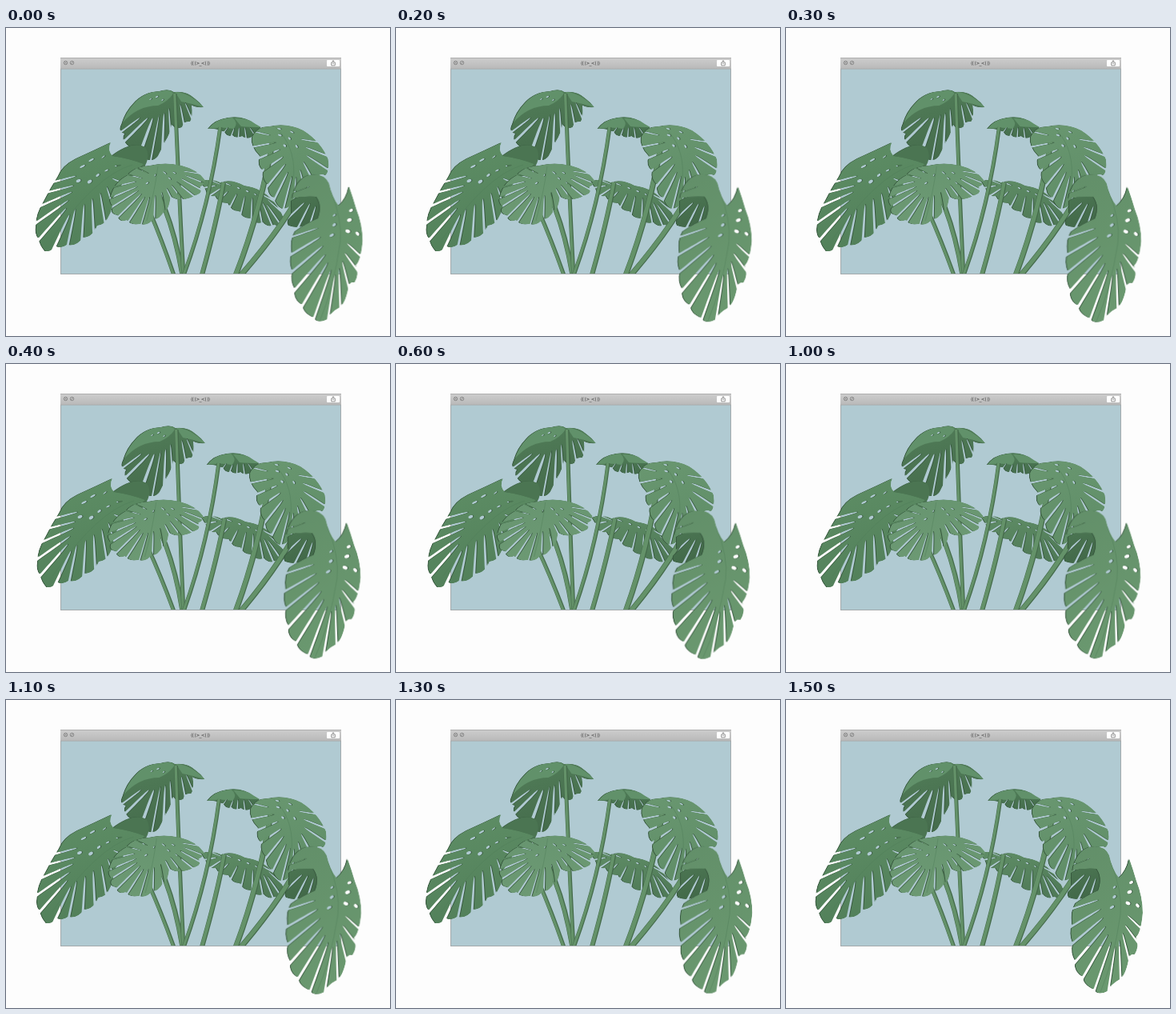
Animation of 480x385 px, one loop 1.6 s. Source, as an HTML page:

```html
<!DOCTYPE html>
<html>
<head>
<meta charset="utf-8">
<title>Swaying monstera</title>
<style>
html, body { margin: 0; width: 100%; height: 100%; overflow: hidden; background: #fdfdfd; }
svg { display: block; }
#scene { position: absolute; left: 0; top: 0; }
.leaf { filter: drop-shadow(-.5px .9px 0 #36573d); }
.title { font: 6px "DejaVu Sans", sans-serif; fill: #444; }
</style>
</head>
<body>
<svg id="scene" width="480" height="385" viewBox="0 0 480 385">
  <defs>
    <linearGradient id="bar" x2="0" y2="1"><stop stop-color="#cdcdcd"/><stop offset="1" stop-color="#b9b9b9"/></linearGradient>
  </defs>
  <rect x="68.5" y="37.5" width="350" height="270" fill="#b0cad2" stroke="#a3a9ab"/>
  <rect x="68" y="37" width="351" height="14" fill="url(#bar)"/>
  <path d="M68 37.5H419M68 51.2H419" stroke="#a9a9a9" stroke-width=".8"/>
  <g fill="none" stroke="#777" stroke-width=".8">
    <circle cx="74.5" cy="43.5" r="2.2"/><circle cx="82.5" cy="43.5" r="2.2"/>
    <path d="M73.6 42.6l1.8 1.8m0-1.8l-1.8 1.8M81.3 44.7l2.4-2.4"/>
  </g>
  <text class="title" x="243" y="46" text-anchor="middle" textLength="24">(( (&gt;_&lt;) ))</text>
  <rect x="401" y="40" width="16" height="8" rx="1" fill="#fff"/>
  <path d="M408 43h-1.3v3.8h4.6V43H410M409 45v-4.2m-1.3 1.2l1.3-1.3 1.3 1.3" fill="none" stroke="#666" stroke-width=".7"/>
  <g id="rear"></g>
  <svg width="480" height="307" id="stems"></svg>
  <g id="front"></g>
</svg>
<script>
const byId = id => document.getElementById(id);

// cuts: outer x, outer y, inner x, inner y, half width.  holes: x, y, rx, ry, angle.
// sway: pivot x, pivot y, shift, stretch, shear, drop.
const leaves = [
  { layer: 'rear', fill: ['#527e59', '#456c4c'], sway: [200, 80, 3, 0, 0, 0],
    outline: 'M145 120Q150 104 160 94 172 80 192 79 204 75 210 80 226 78 236 88 243 93 247 99 238 100 232 96 234 112 230 117 222 116 220 124 212 128 208 120 204 134 200 140 194 152 190 160 184 168 176 164 172 152 168 150 160 154 152 146 144 138 149 132 140 130 145 120Z',
    over: 'M145 119Q150 104 160 94 172 80 192 79 206 76 209 82 202 92 190 97 164 97 145 119ZM211 80Q228 80 247 99 230 94 219 92Z',
    cuts: [[143,131,168,112,1.5],[148,142,178,112,2],[168,157,184,112,2.5],[181,168,192,108,1.5],[196,152,198,106,2],[206,133,204,100,1.5],[214,127,212,98,1.5],[223,122,218,95,1.5],[232,112,224,93,1.3]],
    holes: [[189,86,2.5,1,-25],[196,90,2,1,-40],[181,89,2,.8,-25]] },
  { layer: 'rear', fill: ['#52805a', '#456e4d'], sway: [290, 115, -3, -.02, 0, 0],
    outline: 'M253 126Q262 114 278 112 298 109 312 120L319 124Q312 131 306 137 300 139 296 135 288 139 284 134 278 137 274 130 262 125 253 126Z',
    over: 'M253 126Q262 113 283 112 291 118 285 126 268 123 253 126ZM286 113Q306 112 319 124 304 124 294 123Z',
    cuts: [[272,132,278,124,1],[281,138,286,125,1.3],[291,139,292,124,1.3],[301,139,299,124,1.3],[311,133,305,124,1]],
    holes: [] },
  { layer: 'rear', fill: ['#5f8d66', '#507b58'], sway: [295, 195, 2, .01, 0, 0],
    outline: 'M244 192Q254 187 268 193 282 188 298 197 320 200 334 216 346 230 347 240 344 250 336 246 328 250 322 243 312 246 306 238 296 238 292 229 282 229 278 219 266 219 262 210 252 212 250 202Z',
    cuts: [[247,200,263,197,1.2],[253,211,270,200,1.3],[264,218,278,204,1.4],[279,227,289,207,1.5],[293,237,299,210,1.5],[307,243,308,212,1.5],[321,247,315,215,1.5],[334,249,321,218,1.5],[344,246,326,220,1.4],[347,232,327,214,1.2],[335,216,320,208,1.1],[269,192,282,197,1],[253,189,270,196,.8]],
    holes: [[291,200,2.4,1,25],[302,204,2.5,1,25],[312,208,2,1,30]] },
  { layer: 'front', fill: ['#5f8f66', '#52805a'], sway: [110, 150, 3, 0, 0, 0],
    under: 'M132 160Q158 140 174 149 183 163 167 182L148 188Z',
    outline: 'M131 143Q110 153 88 163 70 172 65 186 56 200 48 216 38 232 38 246 36 258 41 263 43 272 49 279 58 280 62 272 68 277 76 271 88 274 96 262 108 262 114 247 124 246 128 236 134 226 134 212 146 196 150 186 160 182 172 170 154 163 133 160 126 152 131 143Z',
    cuts: [[62,192,88,185,1.3],[54,205,85,197,1.4],[45,222,83,205,1.5],[39,243,79,215,1.8],[41,265,76,225,2],[59,278,80,233,2.2],[77,275,87,226,2],[95,268,98,220,2],[110,254,108,213,2],[124,242,118,206,1.8],[134,222,126,198,1.6],[147,194,133,188,1.3]],
    holes: [[107,165,4,1.4,-28],[96,173,4,1.4,-25],[122,161,3,1,-35],[91,191,3.5,2,-20],[105,192,3.5,2.2,-30],[115,184,3,1.6,-30],[126,178,3,1.2,-25],[140,172,4,1,-12]],
    rib: 'M158 171Q112 184 56 265' },
  { layer: 'front', fill: ['#679570', '#6c9973'], sway: [190, 172, -3.5, 0, 0, 0],
    outline: 'M131 210Q136 192 152 184 160 173 180 172 200 167 220 172 240 177 249 190 248 198 243 198 246 206 240 208 226 216 214 214 208 212 206 210 204 228 198 229 192 240 184 239 178 248 168 245 156 247 152 240 142 244 140 234 130 232 134 224 128 216 131 210Z',
    cuts: [[134,199,163,192,1],[130,213,165,198,1.2],[130,226,166,203,1.4],[139,238,170,207,1.5],[152,245,174,211,1.5],[169,248,180,211,1.3],[186,241,187,209,1.5],[199,232,195,205,1.5],[208,214,201,200,1.4],[223,217,207,196,1.3],[237,211,213,192,1.3],[246,203,219,188,1.2],[249,194,224,184,1],[243,182,222,179,.8],[152,183,171,188,.8],[164,175,179,182,.8]],
    holes: [[187,184,2,1,-60],[199,181,3,1,35],[211,181,2.5,.9,25],[177,194,2.5,1.2,-30],[205,188,2.5,1,35]],
    rib: 'M190 173Q187 200 176 241' },
  { layer: 'front', fill: ['#699770', '#608e68'], sway: [345, 122, -5, -.02, 0, 0],
    outline: 'M308 136Q314 123 330 123 352 118 372 128 394 142 403 164 405 178 400 184 390 180 386 192 380 196 374 196 370 212 362 216 354 226 346 226 338 222 336 212 328 210 328 196 320 190 322 178 314 172 318 160 306 148 308 136Z',
    cuts: [[312,148,338,143,1.2],[314,164,343,152,1.5],[318,181,347,161,1.7],[326,200,350,170,1.8],[335,217,353,180,1.8],[347,229,358,185,1.6],[361,220,363,186,1.6],[374,202,368,177,1.6],[386,193,372,167,1.7],[402,176,376,159,1.5],[400,159,375,149,1.3],[388,142,369,139,1],[313,130,331,134,.8]],
    holes: [[343,134,3,1.3,20],[355,138,2.5,1.5,40],[349,147,2.5,1.6,30],[364,148,2.5,1.5,50],[342,126,3,.9,10],[358,130,3,1,25]],
    rib: 'M337 124Q361 146 360 183 357 207 348 224' },
  { layer: 'front', fill: ['#4c7653', '#426949'], sway: [380, 215, -6, .02, 0, 0],
    outline: 'M357 216Q374 205 392 210 398 226 392 238 386 245 376 245 368 252 354 247 350 242 357 234Z',
    cuts: [[355,236,374,218,1.5],[365,251,381,219,1.7],[380,248,388,222,1.6]], holes: [] },
  { layer: 'front', fill: ['#628f69', '#6a986f'], sway: [400, 185, -6.5, .083, -.0145, .013],
    outline: 'M358 213Q362 190 378 184 398 180 404 194 408 212 416 222 426 214 429 198 434 212 438 226 446 246 446 266 444 290 438 296 442 308 436 318 430 316 428 326 424 346 416 350 408 354 402 364 390 370 386 362 372 356 372 346 360 340 362 326 356 316 359 304 354 292 358 280 356 264 362 254 376 244 390 238 396 222 388 211 372 210 358 213Z',
    cuts: [[356,262,391,250,1.3],[356,284,394,261,1.7],[357,306,397,272,1.8],[360,330,400,283,2],[370,350,403,293,2],[385,366,407,302,1.9],[403,367,412,308,1.8],[419,353,417,300,1.8],[430,327,421,291,1.7],[440,303,424,281,1.6],[445,286,427,269,1.5],[358,206,380,198,.9]],
    holes: [[432,228,3,2,-25],[430,240,3.5,2.4,-20],[428,254,3.5,2.4,20],[440,257,3.2,2.2,45],[411,246,3,2,-35],[408,259,3.5,1.8,-30],[411,234,2.5,1.5,-35]],
    rib: 'M406 203Q421 240 418 268 410 325 393 365' },
];

// base x, bend x, bend y, tip x, tip y, tip shift, width
const stems = [
  [221, 205, 215, 165, 166, 3, 6],
  [222, 216, 205, 211, 82, 3, 5],
  [221, 254, 225, 268, 124, -3, 5],
  [244, 263, 245, 272, 193, 2, 6],
  [211, 195, 265, 180, 230, -3.5, 5],
  [286, 318, 232, 335, 134, -5, 7],
  [291, 350, 245, 379, 187, -6, 7],
];

function cutPath([ox, oy, ix, iy, w]) {
  const len = Math.hypot(ix - ox, iy - oy), ux = (ix - ox) / len, uy = (iy - oy) / len;
  const at = (along, side) => `${ox + ux * along - uy * side} ${oy + uy * along + ux * side} `;
  return `M${at(-3, w)}C${at(len * .6, w * .9)}${at(len, w * .9)}${at(len, 0)}C${at(len, -w * .9)}${at(len * .6, -w * .9)}${at(-3, -w)}Z`;
}

function leafMarkup(leaf, i) {
  const holes = leaf.holes.map(([x, y, rx, ry, turn]) =>
    `<ellipse rx="${rx}" ry="${ry}" transform="translate(${x} ${y}) rotate(${turn})"/>`).join('');
  const [from, to] = leaf.fill;
  return `<g class="leaf" id="leaf${i}">
    <linearGradient id="tone${i}" x2=".3" y2="1"><stop stop-color="${from}"/><stop offset="1" stop-color="${to}"/></linearGradient>
    <mask id="mask${i}" maskUnits="userSpaceOnUse" x="0" y="0" width="480" height="385">
      <path d="${leaf.outline}" fill="#fff"/><path d="${leaf.cuts.map(cutPath).join('')}"/>${holes}
    </mask>
    <path d="${leaf.under || ''}" fill="#4b7552"/>
    <g mask="url(#mask${i})">
      <path d="${leaf.outline}" fill="url(#tone${i})"/>
      <path d="${leaf.over || ''}" fill="#61916a"/>
      <path d="${leaf.rib || ''}" fill="none" stroke="#4f7c58" stroke-opacity=".55" stroke-width=".8"/>
    </g></g>`;
}

for (const layer of ['rear', 'front'])
  byId(layer).innerHTML = leaves.map((leaf, i) => leaf.layer === layer ? leafMarkup(leaf, i) : '').join('');

function draw(time) {
  const step = Math.floor(time % 1600 / 100) + 1;
  const s = (1 - Math.cos(step * Math.PI / 8)) / 2;
  leaves.forEach(({ sway: [x, y, shift, stretch, shear, drop] }, i) =>
    byId('leaf' + i).setAttribute('transform',
      `translate(${x + shift * s} ${y}) matrix(${1 + stretch * s} 0 ${shear * s} ${1 + drop * s} 0 0) translate(${-x} ${-y})`));
  byId('stems').innerHTML = stems.map(([base, bx, by, tx, ty, shift, width]) => {
    const d = `M${base} 312Q${bx + shift * s / 2} ${by} ${tx + shift * s} ${ty}`;
    return `<g fill="none"><path d="${d}" stroke="#456b4b" stroke-width="${width}"/>
      <path d="${d}" stroke="#649269" stroke-width="${width - 1.8}" transform="translate(-.4)"/></g>`;
  }).join('');
}

const start = performance.now();
function tick() {
  draw(performance.now() - start);
  requestAnimationFrame(tick);
}
tick();
</script>
</body>
</html>
```
